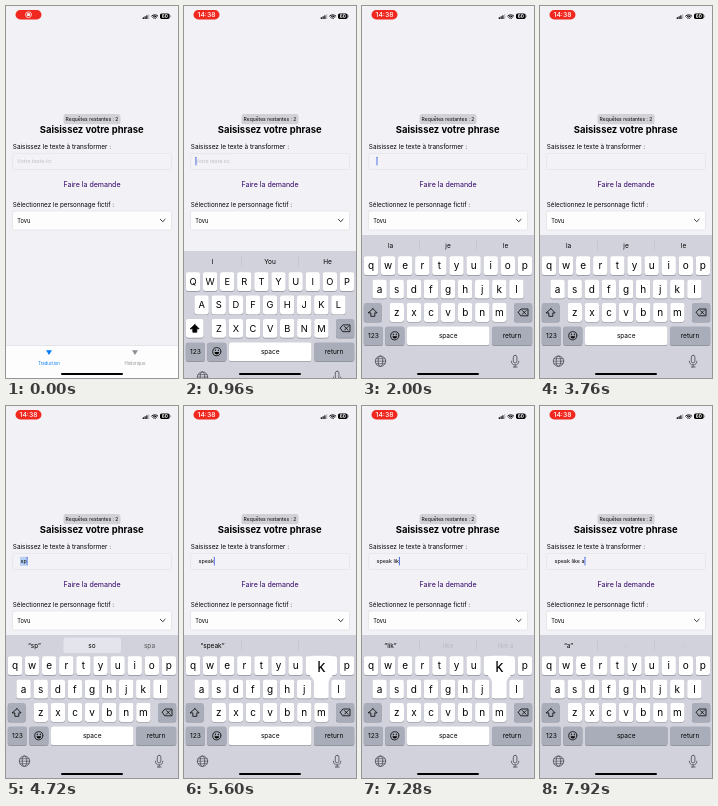
Animation, 172 px wide and 372 px high, one loop 8000 ms. Source, as an HTML page with a canvas:

```html
<!DOCTYPE html>
<html lang="fr">
<head>
<meta charset="utf-8">
<style>
html, body { margin: 0; width: 100%; height: 100%; overflow: hidden; background: #f2f1f6; }
canvas { display: block; width: 172px; height: 372px; }
</style>
</head>
<body>
<canvas></canvas>
<script>
const W = 172, H = 372, LOOP = 8000;
const canvas = document.querySelector('canvas');
const c = canvas.getContext('2d');
const dpr = window.devicePixelRatio || 1;
canvas.width = W * dpr;
canvas.height = H * dpr;

const INK = '#000', DARK_KEY = '#a9adb9', BLUE = '#007aff', CARET = '#4169e1';
const KEY_OPEN = 640, SPRING = 0.0117, PRESS = 120;

// time, typed text, suggestions, pending autocorrection
const steps = [
  [640, '', ['I', 'You', 'He']],
  [1720, '  ', ['la', 'je', 'le']],
  [4080, 's', ['“s”', 'se', 'sa']],
  [4420, 'p', ['“sp”', 'so', 'spa'], true],
  [4920, 'e', ['“spe”', 'spa', 'spécial']],
  [5240, 'a', ['“spea”', 'speak', 'spear']],
  [5600, 'k', ['“speak”', 'speaker', 'speaks']],
  [6040, ' ', ['for', 'to', 'with']],
  [6520, 'l', ['“l”', 'la', 'le']],
  [6780, 'i', ['“li”', 'lire', 'lit']],
  [7220, 'k', ['“lik”', 'like', 'like a']],
  [7400, 'e', ['“like”', 'likes', 'liked']],
  [7600, ' ', ['a', 'the', 'this']],
  [7790, 'a', ['“a”', 'à', 'in']],
  [7905, ' ', ['“a”', 'à', 'in']]
];

const clamp = v => Math.max(0, Math.min(1, v));

function box(x, y, w, h, r, fill, stroke, line = 0.5) {
  c.beginPath();
  c.roundRect(x, y, w, h, r);
  if (fill) { c.fillStyle = fill; c.fill(); }
  if (stroke) { c.strokeStyle = stroke; c.lineWidth = line; c.stroke(); }
}

function text(s, x, y, size, color = INK, align = 'center', weight = 400) {
  c.font = `${weight} ${size}px Inter, Roboto, sans-serif`;
  c.textAlign = align;
  c.fillStyle = color;
  c.fillText(s, x, y);
}

function path(points, { fill, stroke, line = 0.8, close = false }) {
  c.beginPath();
  points.forEach(([x, y]) => c.lineTo(x, y));
  if (close) c.closePath();
  if (fill) { c.fillStyle = fill; c.fill(); }
  if (stroke) { c.strokeStyle = stroke; c.lineWidth = line; c.stroke(); }
}

function arc(x, y, r, from = 0, to = 2 * Math.PI, line = 0.7, color = INK) {
  c.beginPath();
  c.arc(x, y, r, from, to);
  c.strokeStyle = color;
  c.lineWidth = line;
  c.stroke();
}

function faded(alpha, draw) {
  c.save();
  c.globalAlpha *= alpha;
  draw();
  c.restore();
}

function statusBar(t) {
  box(9.5, 4, 26, 9.5, 4.75, '#f0281f');
  const clock = clamp((t - 80) / 300);
  faded(1 - clock, () => {
    arc(22.5, 8.7, 2.9, 0, 7, 0.8, '#fff');
    box(21.1, 7.3, 2.8, 2.8, 0.5, '#fff');
  });
  faded(clock, () => text('14:38', 22.5, 11.2, 6.8, '#fff', 'center', 500));
  for (let i = 0; i < 4; i++)
    box(136.7 + i * 1.8, 11.2 - i, 1.2, 1.8 + i, 0.3, i < 3 ? INK : '#b8b7bc');
  [1.2, 2.8, 4.3].forEach(r => arc(148.7, 13, r, -Math.PI * 0.75, -Math.PI * 0.25, 1));
  box(154, 7.4, 9.6, 5.6, 1.7, INK);
  box(164, 9.2, 0.7, 2, 0.3, '#88878c');
  text('60', 158.8, 12, 4.6, '#fff', 'center', 700);
}

function caretAlpha(t) {
  if (t < KEY_OPEN + 80) return 0;
  if (t < 2320 || t > 3980) return 1;
  const phase = (t - 2320) % 1040;
  if (phase < 240) return 1 - phase / 240;
  return clamp((phase - 470) / 220);
}

function page(t, typed, correcting) {
  box(57.5, 108, 57, 10.2, 2.5, '#d2d1d5');
  text('Requêtes restantes : 2', 86, 114.9, 5, INK);
  text('Saisissez votre phrase', 85.7, 127, 9.45, INK, 'center', 700);
  text('Saisissez le texte à transformer :', 6.8, 142.9, 6.4, INK, 'left');
  box(6.5, 147.5, 159, 16, 1.5, '#f3f2f7', '#dfdee4');

  if (!typed) text('Votre texte ici', 11.3, 157.2, 5.3, '#bdbcc3', 'left');
  c.font = '400 5.4px Inter, Roboto, sans-serif';
  const end = 11.5 + c.measureText(typed.trimEnd() || typed).width;
  if (correcting) box(14, 150.8, end - 14, 9, 0, '#b7cff3');
  text(typed, 11.5, 157, 5.4, INK, 'left');
  faded(caretAlpha(t), () => box(end, 150.8, 0.9, 8.6, 0.4, CARET));

  text('Faire la demande', 86, 180.8, 7.05, '#2f0066');
  text('Sélectionnez le personnage fictif :', 6.8, 200.9, 6.3, INK, 'left');
  box(6.5, 205, 159, 19, 1.5, '#fdfdfe', '#d7d6dc');
  text('Tovu', 11.3, 216.5, 5.7, INK, 'left');
  path([[154.3, 213.3], [156.7, 215.7], [159.1, 213.3]], { stroke: INK });
}

function tabBar() {
  box(0, 339.5, W, 33, 0, '#fdfdfe');
  box(0, 339.3, W, 0.5, 0, '#d3d2d7');
  [['Traduction', 43, BLUE], ['Historique', 129, '#8e8e93']].forEach(([label, x, color]) => {
    path([[x - 3, 344.3], [x + 3, 344.3], [x, 349]], { fill: color, close: true });
    text(label, x, 358.7, 4.3, color);
  });
}

function key(x, y, w, fill = '#fff') {
  box(x, y + 0.7, w, 18.8, 2.3, '#8b8e98');
  box(x, y, w, 18.8, 2.3, fill);
}

function shiftIcon(x, y, upper) {
  const arrow = [[0, -4], [4.3, 0.4], [2, 0.4], [2, 3.8], [-2, 3.8], [-2, 0.4], [-4.3, 0.4]];
  path(arrow.map(([a, b]) => [x + a, y + b]),
    { fill: upper && INK, stroke: INK, line: 0.8, close: true });
}

function suggestions(t, step) {
  const [start, , words, correcting] = step;
  const age = t - start;
  if (correcting) box(57.5, 231.5, 57.5, 15.5, 2.5, '#e4e5ec');
  else [57, 114.5].forEach(x => box(x, 234, 0.5, 10.5, 0, '#babcc6'));
  const quoted = words[0][0] === '“';
  words.forEach((word, i) => {
    const alpha = !quoted || i === 0 || (correcting && i === 1) ? 1 : clamp(age / 500);
    faded(alpha, () => text(word, 28.5 + i * 57.5, 241.8, 6.5));
  });
}

function keyboard(t, step) {
  const elapsed = (t - KEY_OPEN) * SPRING;
  if (elapsed <= 0) return;
  const age = t - step[0];
  const pressed = age < PRESS ? step[1] : '';
  const upper = t < steps[1][0];
  let popup;

  c.save();
  c.translate(0, 143 * (1 + elapsed) * Math.exp(-elapsed));
  box(0, 229, W, 150, 0, '#d1d2db');
  suggestions(t, step);

  ['qwertyuiop', 'asdfghjkl', 'zxcvbnm'].forEach((row, r) => {
    const y = 250.3 + r * 23.4;
    [...row].forEach((letter, i) => {
      const x = [9, 17.6, 34.8][r] + i * 17.1;
      key(x - 7.2, y, 14.4);
      text(upper ? letter.toUpperCase() : letter, x, y + 12.8, upper ? 9.3 : 10);
      if (letter === pressed) popup = [letter, x, y];
    });
  });

  key(1.8, 297.1, 17.8, upper ? '#fff' : DARK_KEY);
  shiftIcon(10.8, 306.5, upper);
  key(152, 297.1, 18.2, DARK_KEY);
  path([[156, 306.4], [159, 303], [166, 303], [166, 309.8], [159, 309.8]],
    { stroke: INK, line: 0.8, close: true });
  path([[160.5, 304.6], [164, 308.2]], { stroke: INK });
  path([[164, 304.6], [160.5, 308.2]], { stroke: INK });

  key(1.8, 320.5, 19.2, DARK_KEY);
  text('123', 11.4, 332.2, 6.7);
  key(23.2, 320.5, 19.2, DARK_KEY);
  arc(32.8, 329.8, 4.1, 0, 7, 0.8);
  box(30.8, 327.6, 1, 1.6, 0.5, INK);
  box(33.8, 327.6, 1, 1.6, 0.5, INK);
  c.beginPath();
  c.arc(32.8, 330.2, 2.3, 0, Math.PI);
  c.fillStyle = INK;
  c.fill();
  key(45, 320.5, 82.5, pressed && !pressed.trim() ? DARK_KEY : '#fff');
  text('space', 86.2, 331.8, 6.5);
  key(130, 320.5, 40.2, DARK_KEY);
  text('return', 150, 331.8, 6.5);

  const gray = '#494b52';
  arc(18.5, 355.2, 5.2, 0, 7, 0.8, gray);
  c.beginPath();
  c.ellipse(18.5, 355.2, 2.3, 5.2, 0, 0, 7);
  c.stroke();
  [-2.5, 0, 2.5].forEach(d => {
    const half = Math.sqrt(27 - d * d);
    path([[18.5 - half, 355.2 + d], [18.5 + half, 355.2 + d]], { stroke: gray, line: 0.6 });
  });
  box(151.3, 349.3, 3.6, 7.6, 1.8, null, gray, 0.8);
  arc(153.1, 355.2, 3.7, 0, Math.PI, 0.8, gray);
  path([[153.1, 358.9], [153.1, 361]], { stroke: gray });
  path([[151, 361], [155.2, 361]], { stroke: gray });

  if (popup) {
    const [letter, x, y] = popup;
    const left = Math.max(1, Math.min(W - 24, x - 11.5));
    path([[left + 1, y - 5], [left + 22, y - 5], [x + 7.2, y + 2], [x + 7.2, y + 18],
      [x - 7.2, y + 18], [x - 7.2, y + 2]], { fill: '#fff', close: true });
    box(left, y - 24, 23, 22, 4, '#fff');
    text(letter, left + 11.5, y - 8, 15);
  }
  c.restore();
}

function draw(t) {
  const done = steps.filter(s => s[0] <= t);
  const step = done[done.length - 1] || steps[0];
  const typed = done.map(s => s[1]).join('');
  c.setTransform(dpr, 0, 0, dpr, 0, 0);
  c.lineJoin = c.lineCap = 'round';
  box(0, 0, W, H, 0, '#f2f1f6');
  statusBar(t);
  page(t, typed, step[3]);
  tabBar();
  keyboard(t, step);
  box(55, 367, 62, 2, 1, INK);
}

const origin = performance.now();
function tick() {
  draw((performance.now() - origin) % LOOP);
  requestAnimationFrame(tick);
}
tick();
</script>
</body>
</html>
```
